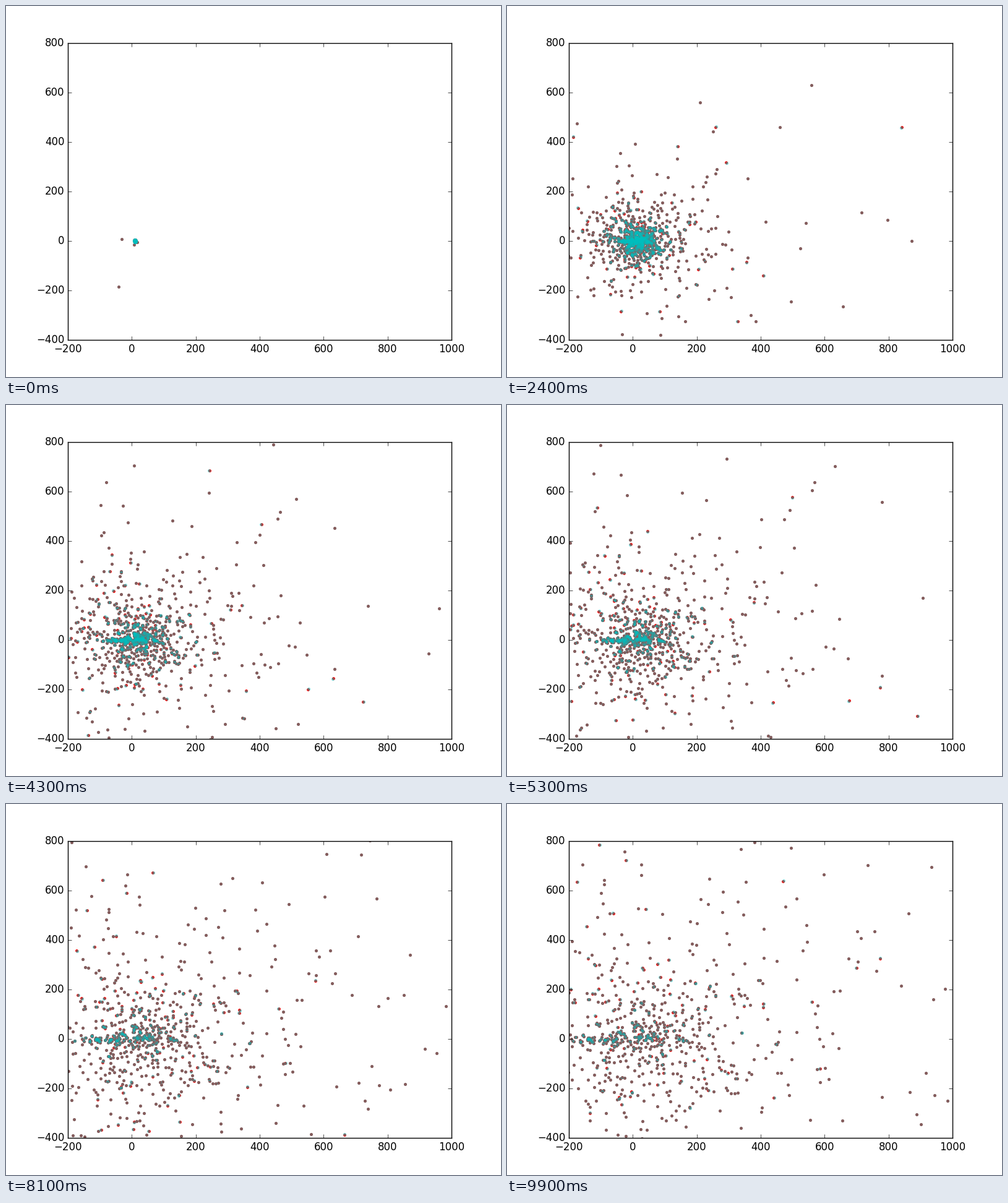
Recreate the animation shown at these times as a matplotlib script. Size 800 px wide and 600 px high, loop 10 s.

```python
import numpy as np
import matplotlib.pyplot as plt
from matplotlib.animation import FuncAnimation

plt.style.use("classic")
plt.rcParams["font.family"] = "DejaVu Sans"

FRAMES, INTERVAL = 100, 100
CLOUD, RIDGE = 920, 80
COUNT = CLOUD + RIDGE
CENTRE = np.array([10.0, 0.0])
STRAYS = [(-31, 7), (-42, -186), (7, -15), (17, -5)]
rng = np.random.default_rng(7)


def polar(radius, angle):
    return np.column_stack([radius * np.cos(angle), radius * np.sin(angle)])


def cloud(n):
    """Heavy-tailed (log-logistic) speeds in all directions, drifting right."""
    u = rng.permutation((np.arange(n) + 0.5) / n)
    speed = 3.3 * (u / (1 - u)) ** (1 / 1.57)
    return polar(speed, rng.uniform(0, 2 * np.pi, n)) + (0.3, 0)


def ridge(n):
    """Slow particles that spread mostly along the horizontal."""
    return rng.normal((-0.6, 0), (1.0, 0.12), (n, 2))


velocity = np.vstack([cloud(CLOUD), ridge(RIDGE)])
start = rng.normal(CENTRE, (0.8, 1.6), (COUNT, 2))
start[:len(STRAYS)] = STRAYS

# Some pairs drift slightly apart and turn around each other
gap = np.where(rng.random(COUNT) < 0.15, 1.9, 0.0)
phase = rng.uniform(0, 2 * np.pi, COUNT)
spin = rng.uniform(-0.4, 0.4, COUNT)

fig = plt.figure(figsize=(8, 6), dpi=100, facecolor="white")
ax = fig.add_axes([0.125, 0.1, 0.775, 0.8])
ax.set_xlim(-200, 1000)
ax.set_ylim(-400, 800)
ax.set_xticks(range(-200, 1001, 200))
ax.set_yticks(range(-400, 801, 200))

dot = dict(ls="none", marker="o", mew=0)
red, = ax.plot([], [], color="#ff0000", ms=3.5, **dot)
cyan, = ax.plot([], [], color="#00bfbf", ms=3.7, alpha=0.48, **dot)


def draw(i):
    pos = start + velocity * i
    shift = polar(gap * min(1, i / 8), phase + spin * i)
    red.set_data(*pos.T)
    cyan.set_data(*(pos + shift).T)
    return red, cyan


anim = FuncAnimation(fig, draw, frames=FRAMES, interval=INTERVAL,
                     repeat=True, repeat_delay=0)
plt.show()
```
